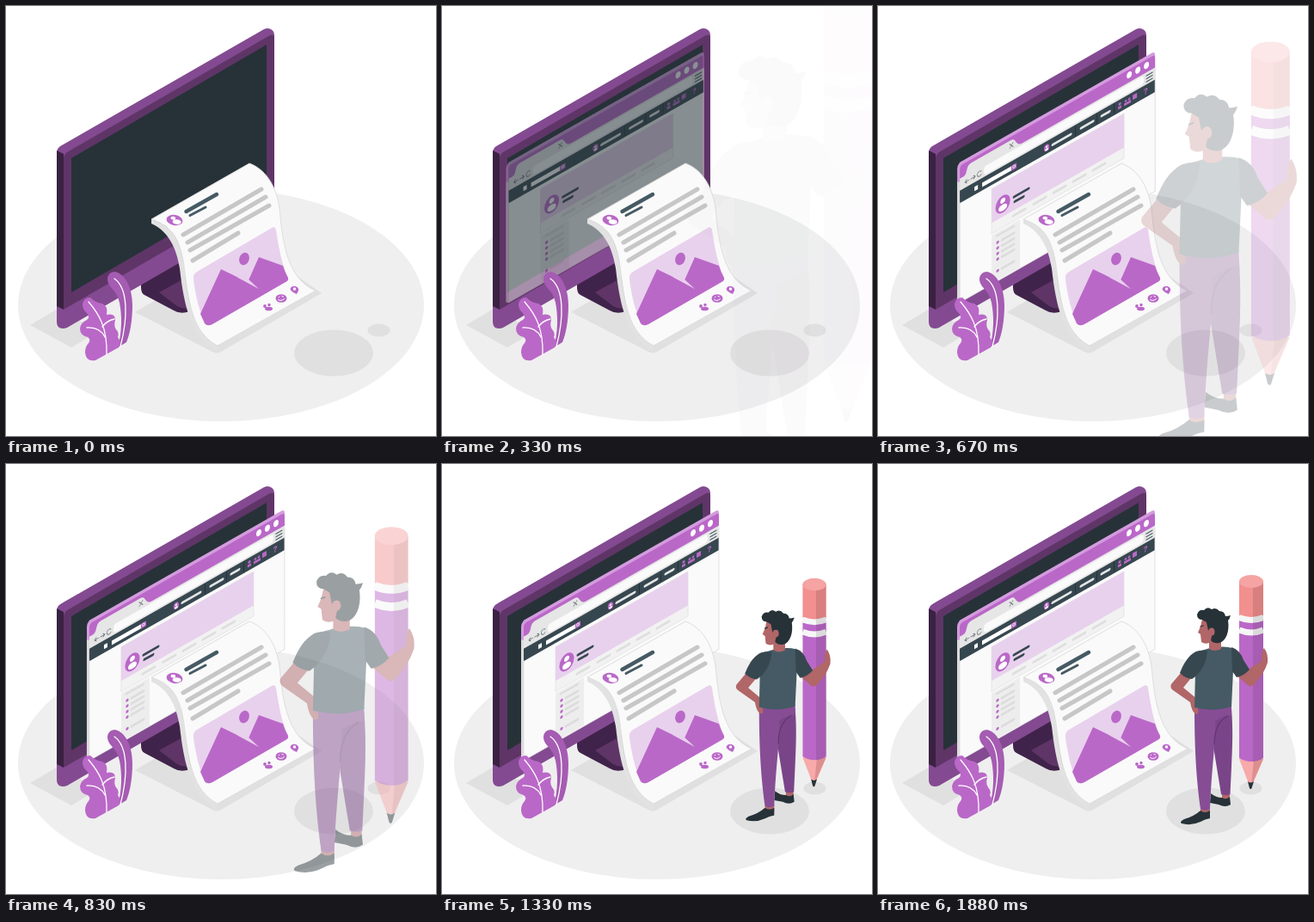
These frames come from a looping animation (500x500 px, 1930 ms). An HTML page:

```html
<!DOCTYPE html>
<html lang="en">
<head>
<meta charset="utf-8">
<title>Publishing a post</title>
<style>
html, body { margin: 0; width: 100%; height: 100%; overflow: hidden; background: #fff; }
svg { display: block; width: 100vw; height: 100vh; }
.accent { fill: #ba68c8; }
.pale { fill: #e8d1ed; }
.dark { fill: #263238; }
.slate { fill: #37474f; }
.skin { fill: #b16668; }
.white { fill: #fafafa; }
.shade { fill: #e0e0e0; }
.line { fill: none; stroke-linecap: round; stroke-linejoin: round; }
</style>
</head>
<body>
<svg viewBox="0 0 500 500">
  <!-- floor and shadows -->
  <ellipse cx="250" cy="348" rx="236" ry="135" fill="#efefef"/>
  <path class="shade" d="M28 371L60 352L108 378L76 397Z"/>
  <path class="shade" d="M150 356L208 322L318 300L367 334L250 402Q245 405 240 402Z"/>
  <ellipse class="shade" cx="381" cy="403.500" rx="46" ry="27"/>
  <ellipse class="shade" cx="433.500" cy="377" rx="13" ry="7.500"/>

  <!-- stand -->
  <path d="M157 321L200 296L216 330L214 355Q203 359 195 354L161 336Q157 334 157 327Z" fill="#40234a"/>
  <path d="M178 333L207 317L214 351Q206 353 199 349Z" fill="#5f3567"/>

  <!-- monitor -->
  <path d="M59 171Q59 165 64 162.500L300 27Q304 25 308 27Q312 29 312 34V235L71 374Q66 376 62 374Q59 372 59 367Z" fill="#834a91"/>
  <path d="M59 168L67 172V353L59 349Z" fill="#3a2141"/>
  <path d="M67 178Q67 173 71 170L307 34Q312 32 312 37V211L67 353Z" fill="#5f3567"/>
  <path class="dark" d="M76 177L303 45V201L76 333Z"/>

  <g id="page">
    <g transform="matrix(1 -.57 0 1 0 0)">
      <path d="M92 242Q92 238 95 236H318Q322 236 322 241V399H95L92 397Z" fill="#d49bde"/>
      <path d="M92 257L95 259V399L92 397Z" fill="#dcdcdc"/>
      <path class="accent" d="M95 244Q95 240 99 240H319Q322 240 322 244V258H95Z"/>
      <path d="M95 255H99Q102 255 103 250Q104 244 108 244H154Q158 244 160 249Q163 255 167 255H322V270H95Z" fill="#e6e6e6"/>
      <path class="white" d="M126 257H306Q309 257 309 261.500Q309 267 306 267H126Q123 267 123 261.500Q123 257 126 257Z"/>
      <rect class="white" x="95" y="283" width="227" height="116"/>
      <rect class="slate" x="95" y="269" width="227" height="14.500"/>
      <path class="line" stroke="#ddd" stroke-width=".8" d="M95 283V399H322V258"/>
      <g class="line" stroke="#707a7e" stroke-width=".9">
        <path d="M153 248l4 5M157 248l-4 5M101 262.500h5M101 262.500l2-2M101 262.500l2 2M108 262.500h5M113 262.500l-2-2M113 262.500l-2 2M120 260.500a2.500 3 0 1 0 0 3.500"/>
        <path stroke="#455a64" stroke-width="1.300" d="M312 259h7M312 262.500h7M312 266h7"/>
      </g>
      <g fill="#fff">
        <ellipse cx="292" cy="246.500" rx="3" ry="3.800"/>
        <ellipse cx="302" cy="246.800" rx="3" ry="3.800"/>
        <ellipse cx="312" cy="247" rx="3" ry="3.800"/>
        <rect x="112" y="274" width="4" height="5"/>
        <rect x="121" y="274.500" width="34" height="5"/>
      </g>
      <rect class="accent" x="155" y="274" width="6" height="6"/>
      <circle cx="158" cy="276.700" r="1.500" fill="none" stroke="#fff" stroke-width=".7"/>
      <ellipse class="accent" cx="196" cy="276.500" rx="3.200" ry="4"/>
      <circle cx="196" cy="275.300" r="1.200" fill="#fff"/>
      <ellipse cx="196" cy="278.500" rx="2" ry="1.200" fill="#fff"/>
      <path class="line" stroke="#e3e6e7" stroke-width="3" d="M203 277H224M236 276.500H250M260 276H269"/>
      <path stroke="#263238" d="M229.500 270V282M254.500 270V282M274.500 270V282"/>
      <g class="accent">
        <circle cx="281" cy="274" r="1.600"/><path d="M279 279.500v-3h4v3z"/>
        <circle cx="288" cy="274.500" r="1.400"/><circle cx="292" cy="274.500" r="1.400"/><path d="M286 279.500v-3h8v3z"/>
        <rect x="296" y="272.500" width="5" height="5.500"/>
        <text x="308.500" y="279.500" font-family="Inter, sans-serif" font-size="9" font-weight="700">?</text>
      </g>

      <!-- profile -->
      <rect x="132" y="288" width="154" height="52" fill="#f2f2f2" stroke="#e3e3e3" stroke-width=".7"/>
      <rect class="pale" x="132" y="288" width="154" height="39.500"/>
      <ellipse class="accent" cx="145" cy="313" rx="8.500" ry="10"/>
      <circle cx="145" cy="309" r="3" fill="#fff"/>
      <ellipse cx="145" cy="317" rx="5" ry="3.700" fill="#fff"/>
      <path class="line" stroke="#37474f" stroke-width="3" d="M158 312H175M159 318H169"/>
      <path id="tabs" class="line" stroke="#dedede" stroke-width="3"/>
      <rect x="132" y="342" width="33" height="56" fill="#ededed"/>
      <path class="line" stroke="#dcdcdc" stroke-width="2.500" d="M138 346H158"/>
      <g id="list"></g>
    </g>
  </g>

  <!-- plant -->
  <path d="M118 317Q119 309 127 309C140 312 147 330 147 348C147 366 144 382 140 391L130 397C135 380 135 360 132 345C129 329 118 328 118 317Z" fill="#a55cb2"/>
  <path class="accent" d="M89 347Q90 339 98 339Q104 345 112 346Q119 349 117 359Q127 357 127 365Q125 372 128 376Q132 380 130 385Q135 392 131 397L104 412Q93 414 92 403Q92 396 96 392Q99 388 95 385Q86 383 86 375Q87 368 94 365Q98 362 94 357Q89 353 89 347Z"/>
  <path class="line" stroke="#fff" stroke-width="1.300" d="M126 317C142 328 142 362 133 396M96 344C108 358 118 374 117 405M94 374Q109 373 115 385M126 364Q117 366 112 373"/>

  <!-- sheet -->
  <path d="M169 248V253C189 262 198 281 202 305C207 350 216 387 245 402L246 395C217 380 212 345 207 302C202 270 193 256 169 248Z" fill="#e2e2e2"/>
  <path d="M169 248L283 183C300 189 314 207 318 235C322 281 329 318 360 331L246 395C217 380 212 345 207 302C202 270 193 256 169 248Z" fill="#fafafa" stroke="#dedede"/>
  <g transform="rotate(10 196 249)">
    <ellipse class="accent" cx="196" cy="249" rx="9.500" ry="6"/>
    <ellipse cx="194" cy="247" rx="2.800" ry="1.900" fill="#fff"/>
    <ellipse cx="199" cy="250.500" rx="5" ry="2.700" fill="#fff"/>
  </g>
  <g class="line" stroke="#455a64">
    <path stroke-width="4.500" d="M209.500 239L245 219"/>
    <path stroke-width="3" d="M214 243.500L232 234"/>
    <path stroke="#c7c7c7" stroke-width="5" d="M206 266L297 213M211 275L302 222M214 284L306 232M217 296L270 264"/>
  </g>
  <path class="pale" d="M218 318Q217 312 222 309L309 258Q313 256 314 260C317 280 320 298 328 316Q329 319 325 321L240 370Q234 373 231 369C225 355 220 335 218 318Z"/>
  <path class="accent" d="M226 358L250 306L281 321L294 292L322 302Q324 309 328 316Q329 319 325 321L240 370Q234 373 231 369Z"/>
  <path class="pale" d="M268 315L294 329L281 317Z"/>
  <ellipse class="accent" cx="277" cy="294" rx="5.700" ry="7.500" transform="rotate(20 277 294)"/>
  <g class="accent">
    <ellipse cx="305.500" cy="352" rx="4.500" ry="2.300"/>
    <circle cx="301" cy="349" r="1.900"/><circle cx="306" cy="347.500" r="1.700"/>
    <ellipse cx="320" cy="340" rx="6.500" ry="4.800"/>
    <path d="M338 335Q331 332 330.500 329Q332 325 337 326Q341 328 340 331Z"/>
    <circle cx="335.500" cy="329" r="1.700" fill="#fff"/>
  </g>
  <path class="line" stroke="#fff" d="M317 339l1-1M321 337.500l1.500.5M316.500 341.500Q320 344 323.500 340.500"/>

  <g id="writer">
    <!-- pencil -->
    <path d="M420 343L432 374H435L448 343Z" fill="#f8a9a9"/>
    <path d="M437 343L434 374L448 343Z" fill="#dd8f8f"/>
    <path class="dark" d="M430 369Q433.500 372 437 369L434.500 377Q433.500 379 432 377Z"/>
    <path class="accent" d="M420 182V342Q434 350 448 342V182Z"/>
    <path d="M420 136V176Q434 182 448 176V136Z" fill="#f28f8f"/>
    <path d="M420 178.500Q434 184.500 448 178.500M420 193Q434 199 448 193" fill="none" stroke="#f6f6f6" stroke-width="7"/>
    <path d="M436 137H448V342Q442 346 436 346Z" opacity=".11"/>
    <ellipse cx="434" cy="136.500" rx="14" ry="7.500" fill="#f5a3a3"/>

    <!-- legs -->
    <path class="skin" d="M400 382H409V390L400 392ZM375 399H386V408L375 409Z"/>
    <path class="dark" d="M387 383Q393 388 400 388Q405 391 409 387L410 396Q404 400 396 396L386 394Z"/>
    <path class="dark" d="M375 403Q380 407 386 403L386 412Q380 413 375 416Q364 421 353 418Q350 416 356 413Q367 410 375 403Z"/>
    <path d="M385 284H411C413 310 412 330 411 352L409.500 384Q405 386 399 384L391 335Z" fill="#7a4588"/>
    <path d="M368 282L411 280L411 292Q401 293 392 299C393 325 388 350 386 401Q380 404 375 401C370 365 368 330 368 282Z" fill="#864d95"/>
    <path class="line" stroke="#633570" stroke-width="1.200" d="M391 326Q391 302 406 293"/>

    <!-- body -->
    <path class="skin" d="M352 243L341 256Q339 260 343 263L363 277Q365 289 370 291Q374 291 372 284L372 274L355 260L364 249Z"/>
    <path class="skin" d="M417 246L432 238L446 229Q446 217 449 214Q454 221 453 231Q449 243 441 252Q435 260 431 258Z"/>
    <path d="M368 219Q380 216 386 214Q403 211 412 214L413 240L411 282Q390 289 368 283L369 242Z" fill="#455a64"/>
    <path class="slate" d="M370 218C360 223 355 233 351 243Q357 249 365 250C376 243 382 231 383 217Q376 216 370 218Z"/>
    <path class="slate" d="M411 213Q421 216 425 228L432 239Q426 246 417 248L412 241Z"/>

    <!-- head -->
    <path class="skin" d="M377 180L375 189L372 196L375 198L376 207Q380 210 385 208L385 215Q391 219 399 215V195L391 179Z"/>
    <path class="dark" d="M377 181Q371 181 371 175Q373 169 379 170Q383 165 388 169Q393 166 397 171Q403 171 404 177Q407 177 410 176Q409 180 407 182C409 194 405 206 397 208Q390 209 387 205L390 192Q386 189 384 194L382 184Z"/>
    <ellipse class="skin" cx="388" cy="195" rx="3.500" ry="4.500"/>
    <path class="line" stroke="#263238" stroke-width="1.300" d="M375 189l3-1"/>
  </g>
</svg>
<script>
const $ = id => document.getElementById(id);
const LOOP = 1930;

$('tabs').setAttribute('d', [157, 181, 204, 227, 250].map(x => `M${x} 333.500h14`).join(''));
$('list').innerHTML = [354, 360.5, 367, 373.5, 387].map(y =>
  `<circle class="accent" cx="139" cy="${y}" r="1.700"/>
   <path class="line" stroke="#dcdcdc" stroke-width="3" d="M144 ${y}H158"/>`).join('');

const cubic = (a, b, s) => 3 * a * s * (1 - s) ** 2 + 3 * b * s * s * (1 - s) + s ** 3;

// Cubic bezier easing; overshoots 1 before settling.
function ease(p, x1, y1, x2, y2) {
  if (p >= 1) return 1;
  let lo = 0, hi = 1;
  for (let i = 0; i < 24; i++) {
    const mid = (lo + hi) / 2;
    if (cubic(x1, x2, mid) < p) lo = mid; else hi = mid;
  }
  return cubic(y1, y2, lo);
}

const clamp = v => Math.min(1, Math.max(0, v));

function draw(t) {
  const slide = ease((t + 15) / 1000, .36, -.01, .5, 1.38);
  $('page').setAttribute('transform', `translate(${30 * (slide - 1)} 0)`);
  $('page').setAttribute('opacity', clamp(slide) ** .9);

  const zoom = ease((t + 15) / 1850, .36, -.05, .45, 1.33);
  const scale = 1 + 1.15 * (1 - zoom);
  $('writer').setAttribute('transform', `translate(397 274) scale(${scale}) translate(-397 -274)`);
  $('writer').setAttribute('opacity', clamp(zoom) ** 1.9);
}

const start = performance.now();
function tick() {
  draw((performance.now() - start) % LOOP);
  requestAnimationFrame(tick);
}
tick();
</script>
</body>
</html>
```
